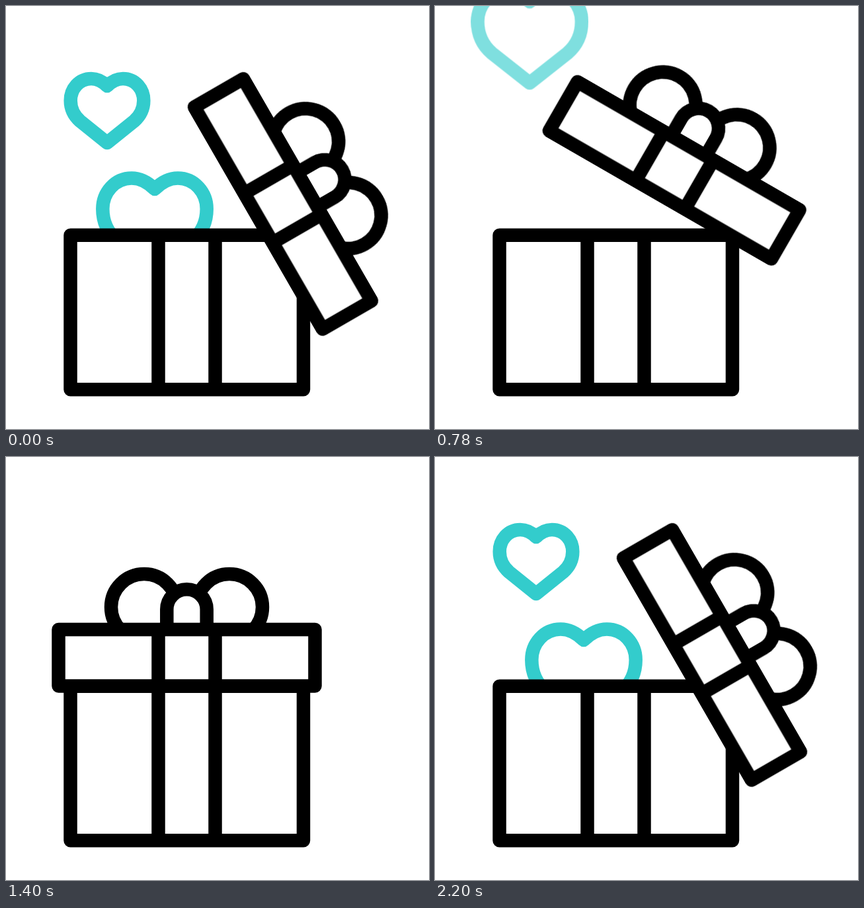
Recreate the animation shown at these times as an HTML page without scripts. Size 640x640 px, loop 2.4 s.

```html
<!DOCTYPE html>
<html lang="en">
<head>
<meta charset="utf-8">
<title>Gift box</title>
<style>
  html, body { margin: 0; width: 100%; height: 100%; overflow: hidden; background: #fff; }
  svg { display: block; width: 100%; height: 100%; }

  .ink { fill: #fff; stroke: #000; stroke-width: 20.5; stroke-linejoin: round; }
  .heart { fill: none; stroke: #33cccc; stroke-width: 20.5; stroke-linejoin: round; }

  .lid-x, .lid, .drift, .heart {
    --ease: cubic-bezier(.333, 0, .667, 1);
    animation: 2400ms var(--ease) infinite;
  }
  .lid-x { animation-name: lid-x; }
  .lid { animation-name: lid-y, lid-turn; }
  .small.drift { animation-name: small-drift; }
  .small.heart { animation-name: small-rise, small-fade; }
  .big.drift { animation-name: big-drift; }
  .big.heart { animation-name: big-rise, big-fade; }

  /* The lid drops shut, rocks twice, rests, then swings open. */
  @keyframes lid-turn {
    0%, 25% { rotate: 60deg; }
    41.667% { rotate: -10deg; }
    50% { rotate: 4.2deg; }
    58.333%, 66.667% { rotate: 0deg; }
    83.333%, 100% { rotate: 60deg; }
  }
  @keyframes lid-x {
    0% { translate: 419px 0; }
    25% { translate: 419px 0; animation-timing-function: cubic-bezier(.4, 0, .72, 1); }
    41.667% { translate: 263px 0; }
    50% { translate: 274.5px 0; }
    58.333%, 66.667% { translate: 273.5px 0; }
    83.333%, 100% { translate: 419px 0; }
  }
  @keyframes lid-y {
    0%, 25% { translate: 0 299.5px; }
    33.333% { translate: 0 247.3px; }
    41.667% { translate: 0 273px; }
    50% { translate: 0 291px; }
    58.333%, 66.667% { translate: 0 303.75px; }
    75% { translate: 0 293.3px; }
    83.333%, 100% { translate: 0 299.5px; }
  }

  /* Hearts fly off the top, then restart hidden behind the box. */
  @keyframes small-rise {
    0% { translate: 0 0; }
    5% { translate: 0 0; animation-timing-function: cubic-bezier(.333, .067, .667, .4); }
    26.667%, 50% { translate: 0 -260px; }
    50.01%, 66.667% { translate: 0 249px; }
    91.667%, 100% { translate: 0 0; }
  }
  @keyframes small-drift {
    0%, 5% { translate: 0 0; }
    21.667%, 50% { translate: -76px 0; }
    50.01%, 66.667% { translate: 10px 0; animation-timing-function: linear; }
    78.333% { translate: 3px 0; animation-timing-function: ease-out; }
    87.5% { translate: -2px 0; }
    91.667%, 100% { translate: 0 0; }
  }
  @keyframes small-fade {
    0%, 15% { opacity: 1; animation-timing-function: linear; }
    25%, 50% { opacity: .6; }
    50.01%, 100% { opacity: 1; }
  }
  @keyframes big-rise {
    0% { translate: 0 0; }
    5% { translate: 0 0; animation-timing-function: cubic-bezier(.333, .05, .667, .383); }
    41.667%, 50% { translate: 0 -479px; }
    50.01%, 66.667% { translate: 0 150px; }
    91.667%, 100% { translate: 0 0; }
  }
  @keyframes big-drift {
    0% { translate: 0 0; }
    5% { translate: 0 0; animation-timing-function: cubic-bezier(.4, .15, .7, .75); }
    18.333% { translate: -39px 0; animation-timing-function: cubic-bezier(.3, .3, .65, 1); }
    33.333%, 50% { translate: -82px 0; }
    50.01%, 100% { translate: 0 0; }
  }
  @keyframes big-fade {
    0%, 25.833% { opacity: 1; animation-timing-function: linear; }
    37.5%, 50% { opacity: .35; }
    50.01%, 100% { opacity: 1; }
  }
</style>
</head>
<body>
<svg viewBox="0 0 640 640">
  <g transform="translate(225 277)">
    <g class="big drift">
      <path class="big heart" d="M0 0C-10-10-22-16.5-35-16.5C-60-16.5-78.7 5-78.7 30C-78.7 49-71 66-57 78L0 123L57 78C71 66 78.7 49 78.7 30C78.7 5 60-16.5 35-16.5C22-16.5 10-10 0 0Z"/>
    </g>
  </g>
  <g transform="translate(153 121)">
    <g class="small drift">
      <path class="small heart" d="M0 0C-6-6-15-11-24-11C-43-11-55.3 5-55.3 22C-55.3 34-50 45-41 53L0 86L41 53C50 45 55.3 34 55.3 22C55.3 5 43-11 24-11C15-11 6-6 0 0Z"/>
    </g>
  </g>

  <g class="ink">
    <rect x="97.5" y="346.75" width="352.5" height="233.5"/>
    <path d="M230.5 346.75V580M316.5 346.75V580"/>
  </g>

  <g class="lid-x">
    <g class="lid ink">
      <circle cx="-64.5" cy="-76.75" r="50"/>
      <circle cx="64.5" cy="-76.75" r="50"/>
      <path d="M-30.2-42.75V-73.2a30.2 30.2 0 0 1 60.4 0V-42.75"/>
      <rect x="-194" y="-42.75" width="388" height="85.5"/>
      <path d="M-43-42.75V42.75M43-42.75V42.75"/>
    </g>
  </g>
</svg>
</body>
</html>
```
